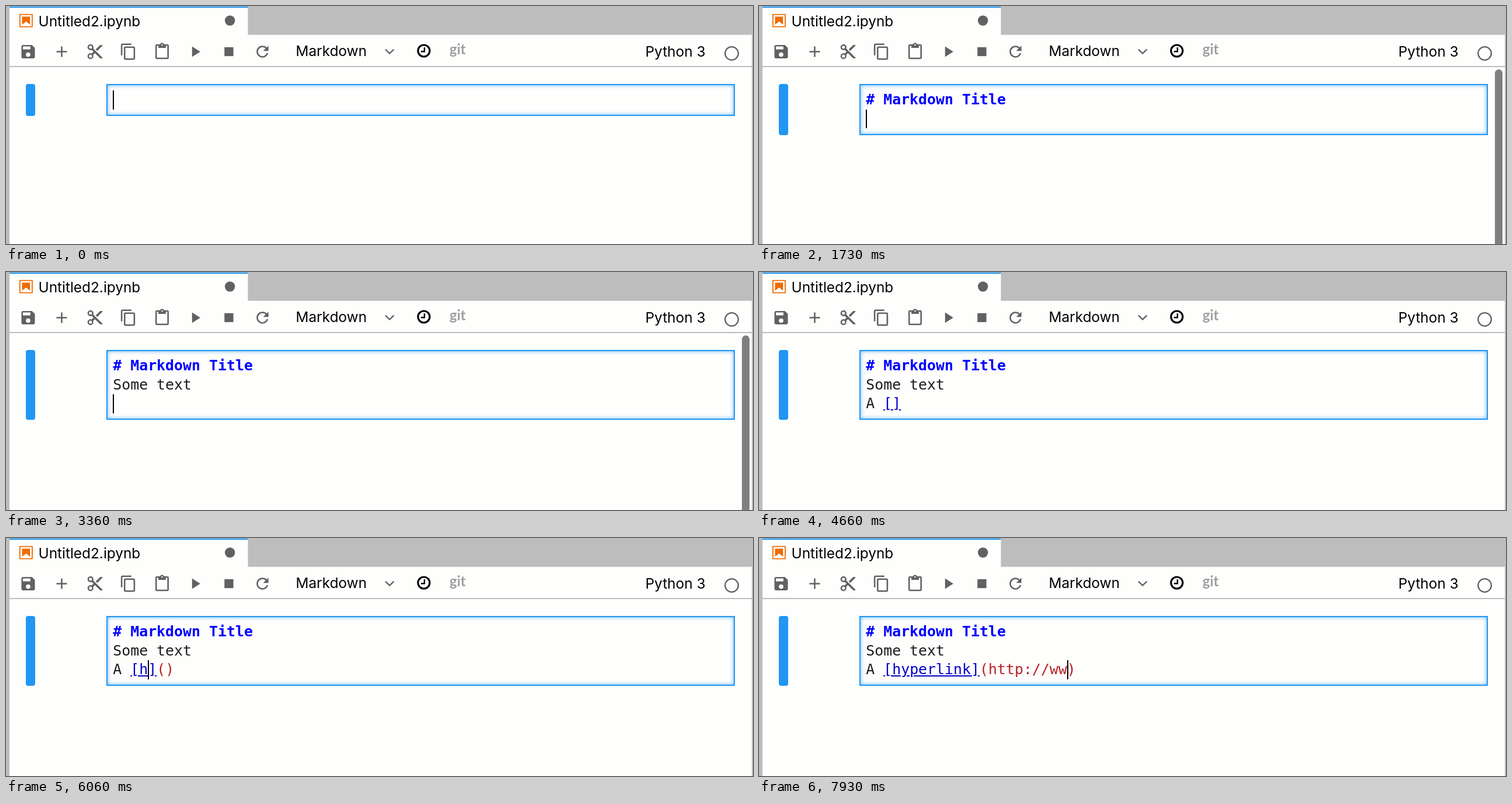
Recreate the animation shown at these times as an HTML page. Size 1280 by 409 pixels, loop 8 s.

```html
<!DOCTYPE html>
<html lang="en">
<head>
<meta charset="utf-8">
<title>Notebook Markdown cell</title>
<style>
  html, body { margin: 0; width: 100%; height: 100%; overflow: hidden; background: #fefefd; }
  svg, #bar, #editor, #scroll, #caret { position: absolute; }
  svg { left: 0; top: 0; font: 24.4px Inter, sans-serif; }
  #bar { left: 34px; top: 134px; width: 16px; border-radius: 4px; background: #2196f3; }
  #editor {
    left: 172px; top: 134px; width: 1077px; box-sizing: border-box;
    padding: 9.25px 9.2px; border: 2px solid #2196f3;
    box-shadow: inset 0 0 7px #64b5f6;
    font: 24.9px/32.5px "DejaVu Sans Mono", monospace; color: #1c1c1c; white-space: pre;
  }
  #lines div { height: 32.5px; }
  #caret { width: 2px; height: 32.5px; background: #000; }
  #scroll { left: 1261px; top: 109px; width: 13px; height: 300px; border-radius: 7px 7px 0 0; background: #7f7f7f; }
  b { color: #00f; }
  u { color: #00c; }
  i { color: #ba2121; font-style: normal; }
</style>
</head>
<body>
<svg width="1280" height="409">
  <path fill="#bdbdbd" d="M0 0H1280V49.5H414.5V0H6V409H0ZM6 103h1274v2H6ZM1278 49h2v360h-2ZM6 0h409v1H6Z"/>
  <path fill="#2196f3" d="M6 1h408.5v2H6Z"/>
  <g fill="#ef6c00" transform="translate(20.6 11.4) scale(1.25)">
    <path d="M18.7 3.3v15.4H3.3V3.3h15.4m1.5-1.5H1.8v18.3h18.3Z"/>
    <path d="M16.5 16.5l-5.4-4.3-5.6 4.3v-11h11Z"/>
  </g>
  <circle cx="383.7" cy="25" r="8.7" fill="#616161"/>
  <text x="55.5" y="34.5">Untitled2.ipynb</text>
  <text x="496.5" y="86">Markdown</text>
  <text x="1095.5" y="87">Python 3</text>
  <text x="760" y="83" fill="#9e9e9e" style="font: bold 24px Lato, sans-serif">git</text>
  <g id="icons" fill="#616161"></g>
  <g fill="none">
    <path d="M650 74.5l7.3 7 7.3-7" stroke="#616161" stroke-width="2.4"/>
    <circle cx="716" cy="77" r="10" stroke="#000" stroke-width="3.2"/>
    <path d="M717 71v7.3h-6" stroke="#000" stroke-width="2.4"/>
    <circle cx="1243.5" cy="81.5" r="11.3" stroke="#616161" stroke-width="2.3"/>
  </g>
</svg>
<div id="bar"></div>
<div id="editor"><div id="lines"></div><div id="caret"></div></div>
<div id="scroll"></div>
<script>
const $ = id => document.getElementById(id);
const LOOP = 8000, LINE = 32.5, BLINK = 530;

// Toolbar icons on a 24 unit grid, each placed by its centre x
const icons = [
  [38, 'M17 3H5c-1.1 0-2 .9-2 2v14c0 1.1.9 2 2 2h14c1.1 0 2-.9 2-2V7zM12 19a3 3 0 1 1 0-6 3 3 0 0 1 0 6zM15 9H5V5h10z'],
  [95.5, 'M19 13h-6v6h-2v-6H5v-2h6V5h2v6h6z'],
  [152.5, 'M9.64 7.64A4 4 0 1 0 7.64 9.64L10 12l-2.36 2.36a4 4 0 1 0 2 2L12 14l7 7h3v-1zM6 8a2 2 0 1 1 0-4 2 2 0 0 1 0 4zM6 20a2 2 0 1 1 0-4 2 2 0 0 1 0 4zM19 3l-6 6 2 2 7-7V3z'],
  [209.7, 'M16 1H4c-1.1 0-2 .9-2 2v14h2V3h12zM19 5H8c-1.1 0-2 .9-2 2v14c0 1.1.9 2 2 2h11c1.1 0 2-.9 2-2V7c0-1.1-.9-2-2-2zM19 21H8V7h11z'],
  [267.5, 'M19 2h-4.18a3 3 0 0 0-5.64 0H5c-1.1 0-2 .9-2 2v16c0 1.1.9 2 2 2h14c1.1 0 2-.9 2-2V4c0-1.1-.9-2-2-2zM12 2a1 1 0 1 1 0 2 1 1 0 0 1 0-2zM19 20H5V4h2v3h10V4h2z'],
  [324, 'M8 5v14l11-7z'],
  [382, 'M6 6h12v12H6z'],
  [439.5, 'M17.65 6.35A8 8 0 1 0 19.73 14h-2.08A6 6 0 1 1 16.22 7.78L13 11h7V4z'],
];
$('icons').innerHTML = icons.map(([x, d]) =>
  `<path fill-rule="evenodd" transform="translate(${x - 15.4} 63.1) scale(1.28)" d="${d}"/>`).join('');

// Key presses: each run of keys is spread evenly over its time span; ← and → move the caret
const keys = [
  ['# Markdown T', 100, 1130], ['itle', 1200, 1460], ['\n', 1730],
  ['S', 2200], ['ome text ', 2260, 3230], ['\n', 3360],
  ['A ', 3600, 3760], ['[', 3930], ['→', 4860], ['(', 5000], ['←', 5320], ['←', 5600],
  ['hyperlink', 6060, 6560], ['→', 6730], ['→', 6900],
  ['http:/', 7100, 7760], ['/ww', 7830, 7930],
].flatMap(([run, from, to = from]) => [...run].map((key, i) =>
  ({ key, time: from + (to - from) * i / Math.max(1, run.length - 1) })));
const pairs = { '[': ']', '(': ')' };

function replay(t) {
  let before = '', after = '', last = 0;
  for (const { key, time } of keys) {
    if (time > t) break;
    last = time;
    if (key === '←') {
      after = before.slice(-1) + after;
      before = before.slice(0, -1);
    } else if (key === '→') {
      before += after[0];
      after = after.slice(1);
    } else {
      before += key;
      after = (pairs[key] || '') + after;
    }
  }
  return { before, after, last };
}

const highlight = line => line[0] === '#' ? `<b>${line}</b>`
  : line.replace(/(\[.*\])(\(.*\))?/, (_, link, url = '') => `<u>${link}</u><i>${url}</i>`);

let shown;
function draw() {
  const t = performance.now() % LOOP;
  const { before, after, last } = replay(t);
  const lines = (before + after).split('\n'), above = before.split('\n');
  const html = lines.map(line => `<div>${highlight(line)}</div>`).join('');
  if (html !== shown) $('lines').innerHTML = shown = html;
  $('bar').style.height = $('editor').style.height = lines.length * LINE + 22.5 + 'px';
  $('caret').style.left = `calc(9.2px + ${above.at(-1).length}ch)`;
  $('caret').style.top = 9.25 + (above.length - 1) * LINE + 'px';
  $('caret').style.opacity = (t - last) % (2 * BLINK) < BLINK ? 1 : 0;
  $('scroll').style.opacity = t < 1730 ? 0 : Math.min(1, Math.max(0, (4400 - t) / 250));
  requestAnimationFrame(draw);
}
draw();
</script>
</body>
</html>
```
